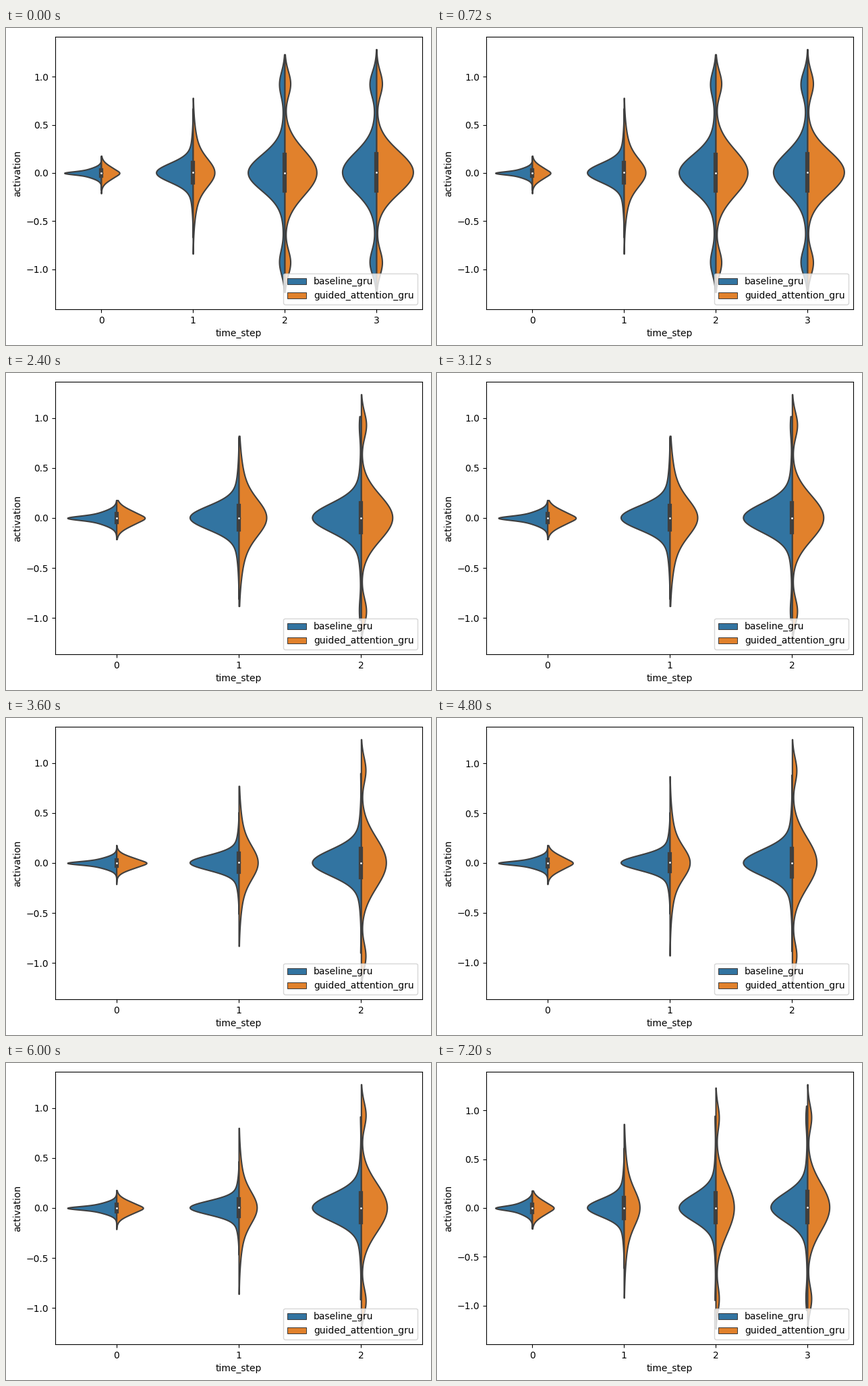
A matplotlib script for the animation above (8000 ms loop, 630x470 px).

```python
import numpy as np
import matplotlib.pyplot as plt
from matplotlib.animation import FuncAnimation
from matplotlib.patches import Rectangle

W, H, DPI = 630, 470, 100
BLUE, ORANGE, DARK = "#3274a1", "#e1812c", "#3f3f3f"
HALF_WIDTH = 0.4
HOLD = 3  # ticks each picture stays
LOBE_AT, LOBE_SPREAD = 0.93, 0.13

# Second bell of each half per time step: (share, width relative to the first)
LEFT_MIX = [(0.55, 3.0), (0.12, 2.4), (0.1, 2.4), (0.1, 2.4)]
RIGHT_MIX = [(0.12, 0.3), (0.35, 2.2), (0, 1), (0, 1)]
CENTER = [0, 0.005, 0.005, 0.01]
SKEW = [0.017, 0.03, 0.002, 0.002]


def scene(limit, tail, spreads, ratios):
    """limit and tail: reach of the last step and of step 1.
    spreads: width of the taller half; ratios: right peak over left peak."""
    reaches = [0.195, tail, 1.235][:len(spreads) - 1] + [limit]
    return list(zip(reaches, spreads, ratios))


SCENES = [
    scene(1.288, 0.81, [0.030, 0.112, 0.245, 0.260], [0.50, 0.59, 0.87, 1.075]),
    scene(1.293, 0.93, [0.031, 0.165, 0.255, 0.265], [0.52, 0.59, 0.93, 0.91]),
    scene(1.237, 0.85, [0.040, 0.135, 0.170], [0.58, 0.565, 0.64]),
    scene(1.239, 0.80, [0.032, 0.085, 0.150], [0.615, 0.39, 0.51]),
    scene(1.244, 0.90, [0.034, 0.085, 0.148], [0.52, 0.41, 0.50]),
    scene(1.239, 0.83, [0.032, 0.078, 0.153], [0.545, 0.37, 0.53]),
    scene(1.270, 0.89, [0.040, 0.103, 0.158, 0.175], [0.59, 0.43, 0.50, 0.60]),
]


def bell(y, mu, s):
    return np.exp(-0.5 * ((y - mu) / s) ** 2)


def profile(y, step, spread, mix):
    """Bell of a given area, with lobes near +-1 once it is wide enough."""
    share, flare = mix
    lobe = np.clip(1.3 * (spread - 0.14), 0, 0.18) if step > 1 else 0
    s = (spread - 2 * lobe * LOBE_SPREAD) / (1 + share * (flare - 1))
    mu = CENTER[step]
    w = (1 - share) * bell(y, mu, s) + share * bell(y, mu, flare * s)
    return w + lobe * bell(np.abs(y), LOBE_AT, LOBE_SPREAD)


def draw_violin(x, reach, spread, ratio):
    y = np.linspace(-reach - SKEW[x], reach - SKEW[x], 600)
    density = 0
    for sign, color, peak, mix in (
            (-1, BLUE, min(1, 1 / ratio), LEFT_MIX[x]),
            (1, ORANGE, min(1, ratio), RIGHT_MIX[x])):
        # Both halves hold the same area, so a lower peak is wider.
        w = peak * profile(y, x, spread / peak, mix)
        density = density + w
        shown = np.abs(y) < (6 * spread / peak if sign < 0 else 2)
        ax.fill_betweenx(y[shown], x, x + sign * HALF_WIDTH * w[shown],
                         facecolor=color, edgecolor=DARK, linewidth=1.5)

    cdf = np.cumsum(density) / density.sum()
    low, median, high = np.interp([0.25, 0.5, 0.75], cdf, y)
    ax.plot([x, x], [low, high], color=DARK, linewidth=4.5)
    ax.scatter(x, median, s=9, color="white", edgecolor=DARK, zorder=3)


fig = plt.figure(figsize=(W / DPI, H / DPI), dpi=DPI, facecolor="white")
ax = fig.add_axes([73 / W, 53 / H, 544 / W, 404 / H])


def draw(i):
    ax.cla()
    steps = SCENES[i // HOLD]
    for x, values in enumerate(steps):
        draw_violin(x, *values)

    limit = 1.1 * steps[-1][0]
    ax.set_ylim(-limit, limit)
    ax.set_xlim(-0.5, len(steps) - 0.5)
    ax.set_xticks(range(len(steps)))
    ax.set_yticks(np.arange(-1, 1.1, 0.5))
    ax.set_xlabel("time_step")
    ax.set_ylabel("activation")

    keys = [Rectangle((0, 0), 0, 0, facecolor=c, edgecolor=DARK, linewidth=0.75)
            for c in (BLUE, ORANGE)]
    ax.legend(keys, ["baseline_gru", "guided_attention_gru"], loc="lower right")
    return []


anim = FuncAnimation(fig, draw, frames=20, interval=400, repeat=True,
                     repeat_delay=0, init_func=lambda: draw(0))
plt.show()
```
